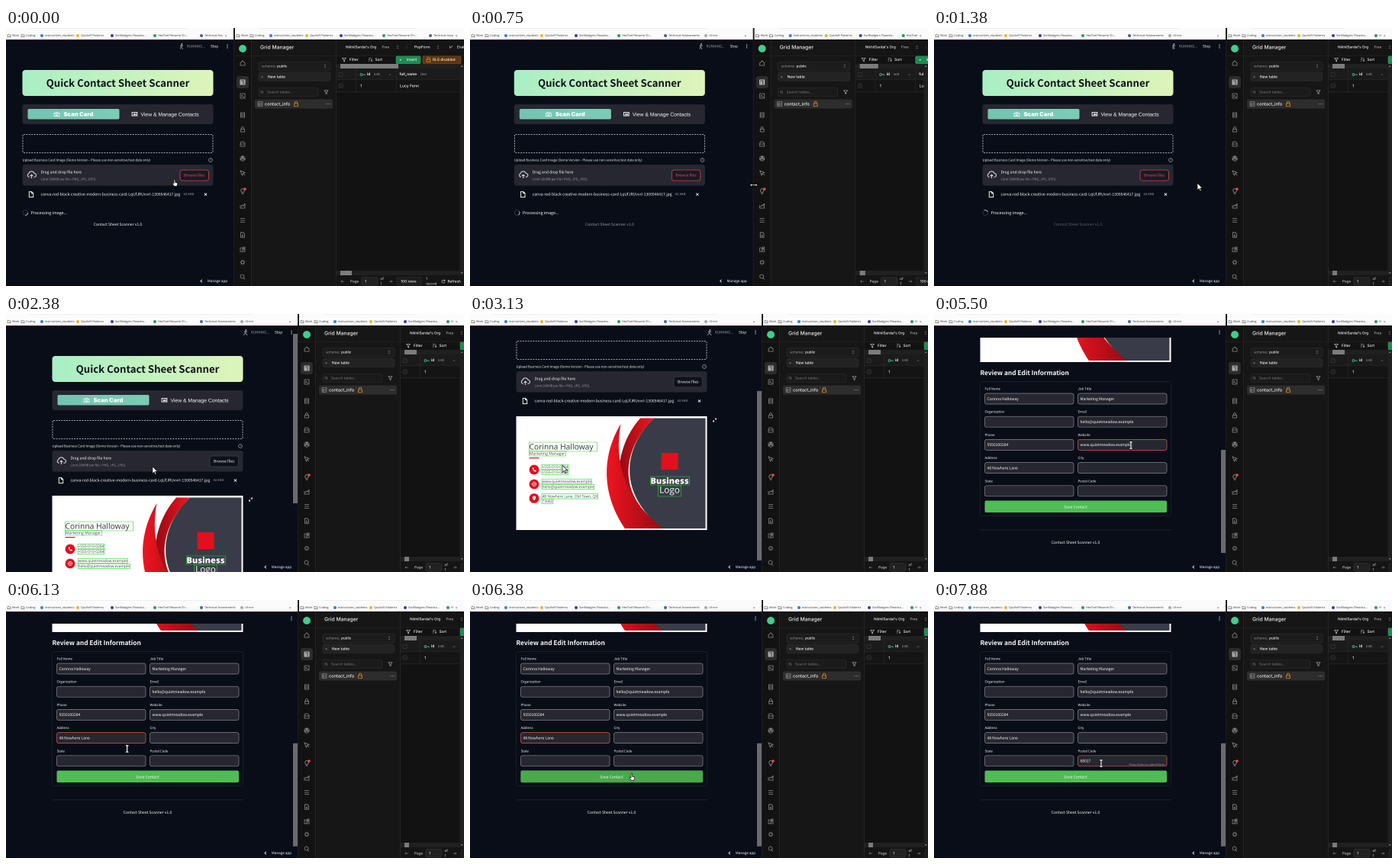
An HTML page with a canvas that plays this animation: 600x338 px, repeating every 8 s.

```html
<!DOCTYPE html>
<html lang="en">
<head>
<meta charset="utf-8">
<title>Contact scanner demo</title>
<style>
html, body { margin: 0; width: 100%; height: 100%; overflow: hidden; background: #090d17; }
canvas { display: block; width: 600px; height: 338px; }
</style>
</head>
<body>
<canvas id="stage"></canvas>
<script>
const W = 600, H = 338, LOOP = 8000, STEP = 125;
const canvas = document.getElementById('stage'), c = canvas.getContext('2d');
// Double resolution keeps the tiny text smooth
const scale = 2 * (window.devicePixelRatio || 1);
canvas.width = W * scale;
canvas.height = H * scale;
c.textRendering = 'geometricPrecision';

const SOURCE = '"Noto Sans CJK JP", "Noto Sans CJK SC", "Open Sans", sans-serif';
const UI = 'Inter, sans-serif', ARIAL = '"Liberation Sans", sans-serif', OPEN = '"Open Sans", sans-serif';
const WHITE = '#fafafa', GREY = '#9a9ca5', PANEL = '#262730', RED = '#e0101c', PAGE = '#090d17';

// Drawing helpers
function text(s, x, y, size, color = WHITE, font = SOURCE, weight = 500, align = 'left') {
  c.font = `${weight} ${size}px ${font}`;
  c.fillStyle = color;
  c.textAlign = align;
  c.fillText(s, x, y + size * 0.35);
}
function box(x, y, w, h, fill, r = 0, stroke, line = 0.6) {
  c.beginPath();
  c.roundRect(x, y, w, h, r);
  if (fill) { c.fillStyle = fill; c.fill(); }
  if (stroke) { c.strokeStyle = stroke; c.lineWidth = line; c.stroke(); }
}
function dot(x, y, r, fill) {
  c.beginPath();
  c.arc(x, y, r, 0, 7);
  c.fillStyle = fill;
  c.fill();
}
function path(d, x, y, stroke, line = 0.8, fill) {
  const p = new Path2D(d);
  c.save();
  c.translate(x, y);
  if (fill) { c.fillStyle = fill; c.fill(p); }
  if (stroke) { c.strokeStyle = stroke; c.lineWidth = line; c.stroke(p); }
  c.restore();
}
function gradient(x0, x1, from, to) {
  const g = c.createLinearGradient(x0, 0, x1, 0);
  g.addColorStop(0, from);
  g.addColorStop(1, to);
  return g;
}
function clipped(x, y, w, h, draw) {
  c.save();
  c.beginPath();
  c.rect(x, y, w, h);
  c.clip();
  draw();
  c.restore();
}
// Eased value between [time, value] keys
function at(t, keys) {
  let i = keys.findIndex(k => k[0] > t);
  if (i < 0) return keys[keys.length - 1][1];
  if (i === 0) return keys[0][1];
  const [t0, a] = keys[i - 1], [t1, b] = keys[i], u = (t - t0) / (t1 - t0);
  return a + (b - a) * u * u * (3 - 2 * u);
}

const ICON = {
  folder: 'M-2-1.5h1.5l.6.6h1.9v2.6h-4z',
  home: 'M-3 0 0-3 3 0V3H-3z',
  table: 'M-3-3H3V3H-3zM-3-1H3M-3 1H3M-1-1V3',
  terminal: 'M-3-3H3V3H-3zM-1.5-1 0 0-1.5 1M.5 1.5H2',
  database: 'M-2.5-3H2.5V3H-2.5zM-2.5-1H2.5M-2.5 1H2.5',
  lock: 'M-2.4-.5H2.4V3H-2.4zM-1.4-.5V-2A1.4 1.4 0 0 1 1.4-2V-.5',
  store: 'M-3-1 -2-3H1L3-1V3H-3zM-3 0H3',
  swirl: 'M3.2 0A3.2 3.2 0 1 1 0-3.2 3.2 3.2 0 0 1 3.2 0M0-3.2 2 1-2 1zM-3 1 0-1 3 1',
  pointer: 'M-3-3 3-.6.4.4-.6 3zM.5.5 3 3',
  bulb: 'M-1.2 2V.8A2.3 2.3 0 1 1 1.2.8V2zM-1 3.2H1',
  chart: 'M-3-1V3H3V-3M-2 1 0-1 1 0 3-3',
  list: 'M-3-2.5H3M-3 0H3M-3 2.5H3',
  doc: 'M-2.4-3.2H.8L2.4-1.6V3.2H-2.4zM-1 .2H1M-1 1.7H1',
  sheet: 'M-2.7-3.6H.6L2.7-1.5V3.6H-2.7zM.6-3.6V-1.5H2.7',
  squares: 'M-3-2H0V3H-3zM0 0H3V3H0zM1-3H3V-1H1z',
  gear: 'M2 0A2 2 0 1 1-2 0 2 2 0 1 1 2 0M0-3.3V-2M0 2V3.3M-3.3 0H-2M2 0H3.3M-2.3-2.3-1.4-1.4M2.3 2.3 1.4 1.4M-2.3 2.3-1.4 1.4M2.3-2.3 1.4-1.4',
  search: 'M2-.5A2.5 2.5 0 1 1-3-.5 2.5 2.5 0 1 1 2-.5M1.3 1.5 3 3.2',
  funnel: 'M-2.4-2.2H2.4L.6.2V2.4L-.6 1.8V.2z',
  cloud: 'M-3 2.8H-3.4A2.6 2.6 0 0 1-3.6-2 3.7 3.7 0 0 1 3.4-2.2 2.5 2.5 0 0 1 3.6 2.8H3M0 4.5V-.3M-1.8 1.4 0-.4 1.8 1.4',
  cross: 'M-1.6-1.6 1.6 1.6M1.6-1.6-1.6 1.6',
  updown: 'M-1-.8 0-1.8 1-.8M-1 .8 0 1.8 1 .8',
  down: 'M-1.2-.6 0 .6 1.2-.6',
  right: 'M-2 0H2M.6-1.4 2 0 .6 1.4',
  left: 'M2 0H-2M-.6-1.4-2 0-.6 1.4',
  idCard: 'M-3.4-2.6H3.4V2H-3.4zM-1.2 0A.8.8 0 1 0-1.2-.1M1-.8H2.4M1 .6H2.4',
  camera: 'M-3.4-1.6H-1.6L-1-2.6H1L1.6-1.6H3.4V2.6H-3.4zM1.2.4A1.2 1.2 0 1 1 1.2.3',
  expand: 'M.6-.6 2-2M.4-2H2V-.4M-.6.6-2 2M-.4 2H-2V.4'
};
const RAIL = [['home', 46], ['table', 71], ['terminal', 89], ['database', 114], ['lock', 133], ['store', 152],
  ['swirl', 171], ['pointer', 190], ['bulb', 214], ['chart', 233], ['list', 252], ['doc', 271],
  ['squares', 290], ['gear', 307], ['search', 326]];
const BOOKMARKS = [[8, 'Work'], [26, 'Coding'], [51, 'instructions_students', '#3b7de0'],
  [98, 'Quizloft Patterns', '#f0b429'], [143, 'SortBadgers Flowcha...', '#3f3fa8'],
  [199, 'HexTrail Resume Ch...', '#2f9e57'], [260, 'Technical Assessments', '#4a6a9c'], [313, 'I-Error', '#aaa']];

function chrome(x, w) {
  clipped(x, 0, w, 15, () => {
    box(x, 0, w, 15, '#fbfbfc');
    box(x + 30, -4, w - 90, 5, '#eceef2', 3);
    for (const [tx, label, color] of BOOKMARKS) {
      if (color) dot(x + tx - 4, 10, 2, color);
      else path(ICON.folder, x + tx - 4, 10, '#555', 0.6);
      text(label, x + tx, 9.7, 3.85, '#333', OPEN);
    }
    box(x + w - 14, 5, 14, 10, '#fbfbfc');
    text('»', x + w - 11, 9.7, 5, '#444', OPEN);
  });
}

// Business card, origin at its top-left corner
function card() {
  box(0, 0, 250, 149, '#fff');
  clipped(2, 2.5, 246, 144.5, () => {
    path('M181 2C136 45 136 105 193 148H249V2z', 0, 0, null, 0, '#393c48');
    path('M163 2C140 28 130 60 134 118H163C139 88 140 42 181 2z', 0, 0, null, 0, gradient(132, 178, '#8e0a12', '#ef1520'));
    path('M137 10C113 50 110 100 143 148H194C150 115 126 70 137 10z', 0, 0, null, 0, gradient(117, 190, '#ef1520', '#980b14'));
  });
  text('Corinna Halloway', 17, 40, 10.3, '#33343c', OPEN, 400);
  text('Marketing Manager', 17.5, 48.5, 5.1, '#44454c', OPEN, 400);
  box(17, 54, 13, 1.2, RED);
  for (const y of [70, 89, 107.5]) dot(23.5, y, 6.4, RED);
  path('M-2-2.5C-2 1 0 2.5 2.5 2.5L2.8 1 1.2.3.4 1-.8-.4 0-1.2-.8-2.8z', 23.5, 70, null, 0, '#fff');
  path('M2.6 0A2.6 2.6 0 1 1-2.6 0 2.6 2.6 0 1 1 2.6 0M-2.6 0H2.6M0-2.6V2.6', 23.5, 89, '#fff', 0.6);
  path('M0 3C-4-2-1.5-3 0-3S4-2 0 3z', 23.5, 107.5, null, 0, '#fff');
  const lines = [['+555-010-0284', 66.5], ['+555-010-0284', 73.5], ['www.quietmeadow.example', 85.5],
    ['hello@quietmeadow.example', 92.5], ['48 Nowhere Lane, Old Town, QX', 105], ['73082', 111.5]];
  for (const [s, y] of lines) {
    text(s, 34, y, 4.9, '#44454c', OPEN, 400);
    box(33.5, y - 3.3, c.measureText(s).width + 1, 6.4, null, 0, '#25d825');
  }
  box(190, 48, 22, 22, RED);
  text('Business', 201, 84.5, 11, '#fff', OPEN, 800, 'center');
  text('Logo', 201, 96.5, 11.8, '#fff', OPEN, 400, 'center');
  for (const b of [[17, 34, 89, 12], [17, 45.5, 48, 6.5], [176, 79, 51, 11], [186, 91, 30, 14]]) box(...b, null, 0, '#25d825');
}

function uploader(s) {
  box(0, 55, 250, 34, gradient(0, 250, '#a9efc5', '#def5ba'), 4);
  text('Quick Contact Sheet Scanner', 125, 72.5, 13.2, '#10131a', SOURCE, 700, 'center');
  box(0, 100, 250, 26, PANEL, 3);
  box(7, 106, 120, 13.5, gradient(7, 127, '#74c4b2', '#7cccb6'), 2);
  path(ICON.camera, 45, 113, '#fff', 0.8);
  text('Scan Card', 54, 113, 7.6, '#fff', UI, 900);
  path(ICON.idCard, 147, 113, '#fff', 0.9);
  text('View & Manage Contacts', 155, 113, 6.8, '#fff', ARIAL, 400);
  c.setLineDash([2, 1.4]);
  box(0.5, 139.5, 249, 24, null, 1, '#d8d8dc', 0.8);
  c.setLineDash([]);
  text('Upload Business Card Image (Demo Version - Please use non-sensitive/test data only)', 0, 173, 4.25);
  path('M2.4 0A2.4 2.4 0 1 1-2.4 0 2.4 2.4 0 1 1 2.4 0', 246.5, 173, '#bbb', 0.6);
  text('?', 246.5, 173, 3.6, '#ccc', SOURCE, 500, 'center');
  box(0, 179, 250, 27.5, PANEL, 3);
  path(ICON.cloud, 12, 192.5, '#c4c6ce', 1.2);
  text('Drag and drop file here', 24, 188.5, 5.05);
  text('Limit 200MB per file • PNG, JPG, JPEG', 24, 198, 4.15, GREY);
  const active = !s.cardShown;
  box(206.5, 186, 37.5, 14, active ? '#171a24' : '#0e111b', 3, active ? '#d8434b' : '#3c3f4a', 0.8);
  text('Browse files', 225.2, 193, 4.9, active ? '#f04a50' : WHITE, SOURCE, 500, 'center');
  path(ICON.sheet, 11.5, 218, '#eee', 1);
  text('canva-red-black-creative-modern-business-card-LqUfJRUvvrI-1300546417.jpg', 24, 217.5, 5.05);
  text('82.9KB', 211, 217.5, 4.2, GREY);
  path(ICON.cross, 240, 218, '#eee', 0.9);
}

function field(label, value, x, y, focused) {
  text(label, x, y, 4.35);
  box(x, y + 6, 116.5, 14, PANEL, 2.5, focused ? '#e2574f' : '#85868e', 0.7);
  text(value, x + 3, y + 13, 5);
}

function form(s) {
  text('Review and Edit Information', 0, 401, 8.3, WHITE, SOURCE, 700);
  box(0, 412.5, 250, 176, null, 3, '#22252f', 0.7);
  const rows = [['Full Name', 'Corinna Halloway', 'Job Title', 'Marketing Manager'],
    ['Organization', '', 'Email', 'hello@quietmeadow.example'],
    ['Phone', '5550100284', 'Website', 'www.quietmeadow.example'],
    ['Address', '48 Nowhere Lane', 'City', ''],
    ['State', '', 'Postal Code', s.postal]];
  rows.forEach(([l1, v1, l2, v2], i) => {
    const y = 422 + i * 30.2;
    field(l1, v1, 6, y, s.focus === l1);
    field(l2, v2, 128, y, s.focus === l2);
    if (s.focus === l2 && s.caret) box(131.5 + c.measureText(v2).width, y + 10, 0.6, 6, '#fff');
  });
  if (s.postal) text('Press Enter to submit form', 242, 560.5, 3.8, GREY, SOURCE, 400, 'right');
  box(6, 568.5, 238.5, 15.5, s.hover ? '#4aa84d' : '#4fbd55', 2, s.hover ? '#3f9143' : null);
  text('Save Contact', 125, 576.5, 5, '#f4fff4', SOURCE, 500, 'center');
  box(0, 606.5, 250, 0.7, '#2b2e38');
  footer(623, 1);
}
function footer(y, alpha) {
  text('Contact Sheet Scanner v1.0', 125, y, 5, `rgba(244,245,247,${alpha})`, SOURCE, 500, 'center');
}

function leftPane(s) {
  const w = s.split - 1;
  box(0, 0, w, H, PAGE);
  clipped(0, s.scroll ? 31 : 15, w, H, () => {
    c.translate(s.split / 2 - 128 - (s.cardShown ? 3 : 0), -s.scroll);
    uploader(s);
    if (s.cardShown) {
      c.save();
      c.translate(0, 238);
      card();
      c.restore();
      if (!s.formShown) path(ICON.expand, 260, 243, '#ddd', 0.9);
    } else {
      const a = s.t / 130;
      c.lineWidth = 0.8;
      c.strokeStyle = '#3a3d48';
      c.beginPath(); c.arc(3.8, 242, 3.4, 0, 7); c.stroke();
      c.strokeStyle = '#d5d6da';
      c.beginPath(); c.arc(3.8, 242, 3.4, a, a + 1.6); c.stroke();
      text('Processing image...', 11, 242, 5.3);
      footer(257, s.stale);
    }
    if (s.formShown) form(s);
  });
  box(0, 14.8, w, 0.8, '#7c2c36');
  if (!s.formShown) {
    const k = Math.sin(s.t / 60);
    path(`M0-1.5-1 1.5-${2 + k} 3.5M-1 1.5 1 2 ${1 + k} 4M-2-.5 0-1.5 2 0`, s.split - 69, 24, '#a9abb3', 0.8);
    dot(s.split - 68.6, 21, 1, '#a9abb3');
    text('RUNNING...', s.split - 62, 24, 4.5, '#a0a2aa');
    text('Stop', s.split - 31, 24, 4.7);
  }
  for (const y of [22, 24, 26]) dot(s.split - 9, y, 0.6, '#eee');
  path('M1-1.8-1 0 1 1.8', s.split - 43, 331.5, '#eee', 0.9);
  text('Manage app', s.split - 35, 331.5, 4.6);
  if (s.cardShown) {
    const k = s.formShown ? 0.469 : 0.72;
    box(s.split - 7, 26 + s.scroll * k, 6, s.formShown ? 135 : 222, '#6a6b70');
  }
}

function sidebar() {
  box(299, 15, 22, H, '#121212');
  dot(310, 27, 5, '#3ecf8e');
  box(302, 63, 16, 16, '#2c2c2c', 3);
  for (const [name, y] of RAIL) path(ICON[name], 310, y, name === 'table' ? '#eee' : '#8c8c8c', 0.8);
  dot(313, 211, 1.8, '#e5484d');

  box(321, 15, 111, H, '#161616');
  text('Grid Manager', 333, 25, 6.8, '#f0f0f0', UI);
  box(331, 44.5, 94, 11.5, '#1c1c1c', 2.5, '#333');
  text('schema:', 335, 50, 4.5, '#888', UI);
  text('public', 355, 50, 4.6, '#eee', UI);
  path(ICON.updown, 418, 50, '#888', 0.6);
  box(331, 58, 94, 11.5, '#232323', 2.5, '#2f2f2f');
  text('+', 334, 63.8, 5, '#aaa', UI);
  text('New table', 343, 63.8, 4.8, '#f2f2f2', UI);
  box(331, 78.5, 78, 11, '#1a1a1a', 2.5, '#303030');
  c.save();
  c.translate(335.5, 84);
  c.scale(0.55, 0.55);
  path(ICON.search, 0, 0, '#777', 1);
  c.restore();
  text('Search tables...', 342, 84, 4.6, '#6c6c6c', UI);
  path(ICON.funnel, 419.5, 84, '#aaa', 0.7);
  box(326, 93.5, 102, 12, '#2d2d2d', 2);
  path(ICON.table, 333, 99.5, '#aaa', 0.5);
  text('contact_info', 339, 99.3, 5.6, '#f5f5f5', UI);
  path(ICON.lock, 380, 99.5, '#e08a1e', 0.8);
  for (const x of [420, 422, 424]) dot(x, 99.5, 0.5, '#aaa');
}

function grid(shift) {
  box(432, 15, 400, H, '#121212');
  box(432, 15, 400, 21, '#151515');
  text("NikhilSardal's Org", 445, 25, 4.7, '#f2f2f2', UI);
  text('Free', 492.5, 25, 4.6, '#aaa', UI);
  path(ICON.updown, 513, 25, '#888', 0.6);
  text('/', 524, 25, 5, '#555', UI);
  text('PopForm', 535, 25, 4.8, '#f2f2f2', UI);
  path(ICON.updown, 566, 25, '#888', 0.6);
  path('M-1.6-2V2M1.6-2V-1C1.6.5-1.6 0-1.6 1.4', 583, 25, '#aaa', 0.7);
  text('Enable branching', 591, 25, 4.7, '#eee', UI);
  path(ICON.funnel, 443, 41.5, '#bbb', 0.7);
  text('Filter', 450, 41.5, 4.8, '#f2f2f2', UI);
  path('M-2-1.8H1M-2 0H0M-2 1.8H-.8M2-2V2M1 1 2 2 3 1', 477, 41.5, '#bbb', 0.7);
  text('Sort', 483.5, 41.5, 4.8, '#f2f2f2', UI);
  box(511, 36.5, 32, 10.5, '#1c8c50', 2, '#2ba56c');
  path(ICON.down, 517, 41.7, '#dfe', 0.7);
  text('Insert', 525, 41.5, 4.8, '#f2fff8', UI);
  box(546, 36.5, 50, 10.5, '#5e3512', 2, '#8a5a22');
  path(ICON.lock, 553.5, 41.6, '#e08a1e', 0.7);
  text('RLS disabled', 559, 41.5, 4.8, '#f2e4d6', UI);

  box(432, 47, 400, 6, '#202020');
  box(438, 47, 76 - shift * 0.714, 6, '#7c7c7c');
  box(432, 53, 400, 14.5, '#1b1b1b');
  box(432, 67.5, 400, 16, '#141414');
  for (const y of [67.5, 83.5]) box(432, y, 400, 0.6, '#2a2a2a');
  for (const x of [458, 511]) box(x, 53, 0.6, 30.5, '#2a2a2a');
  for (const y of [61, 75.5]) box(436, y - 2.6, 5.2, 5.2, '#1d1d1d', 1, '#3c3c3c');
  path('M.3 0A1.4 1.4 0 1 1-2.5 0 1.4 1.4 0 1 1 .3 0M.3 0H3.5V1.2', 466.5, 61, '#3ecf8e', 0.8);
  text('id', 473, 60.5, 4.9, '#f5f5f5', UI, 600);
  text('int8', 482, 60.5, 4.3, '#8c8c8c', UI);
  path(ICON.down, 503, 61, '#777', 0.6);
  text('full_name', 515.5, 60.5, 4.8, '#f5f5f5', UI, 600);
  text('text', 543, 60.5, 4.4, '#8c8c8c', UI);
  text('1', 464, 75.5, 5, '#f0f0f0', UI);
  text('Lucy Fenn', 516, 75.5, 5.1, '#f0f0f0', UI);

  box(432, 318, 400, 6, '#202020');
  box(438, 318, 15 - shift * 0.107, 6, '#7c7c7c');
  box(432, 324, 400, 14, '#151515');
  path(ICON.left, 441, 332, '#777', 0.7);
  text('Page', 451, 332, 4.7, '#bbb', UI);
  box(466, 326.5, 21, 10.5, '#212121', 2, '#3a3a3a');
  text('1', 470, 332, 4.8, '#f0f0f0', UI);
  text('of', 490.5, 328.5, 4.6, '#bbb', UI);
  text('1', 490.5, 335, 4.6, '#bbb', UI);
  path(ICON.right, 504, 332, '#777', 0.7);
  box(512, 326.5, 32, 10.5, '#1d1d1d', 2, '#333');
  text('100 rows', 517, 332, 4.8, '#f0f0f0', UI);
  text('1', 550, 328.5, 4.6, '#bbb', UI);
  text('record', 550, 335, 4.6, '#bbb', UI);
  path('M1.8-.8A2 2 0 1 0 1.8.9M2-2.2V-.6H.4', 573, 332, '#bbb', 0.7);
  text('Refresh', 578.5, 332, 4.7, '#f0f0f0', UI);
}

function rightPane(split) {
  const shift = split - 299;
  box(split - 1, 0, 2, H, '#1c1c1f');
  clipped(split, 15, W - split, H, () => {
    c.translate(shift, 0);
    sidebar();
    grid(shift);
    box(299, 36, 500, 0.6, '#262626');
    for (const x of [321, 432]) box(x, 15, 0.7, H, '#2a2a2a');
  });
  box(594.5, 47, 5.5, 277, '#202020');
  path('M-1.4 1 0-1 1.4 1z', 597.2, 50, null, 0, '#8a8a8a');
  path('M-1.4-1 0 1 1.4-1z', 597.2, 321, null, 0, '#8a8a8a');
}

const POINTER = {
  arrow: 'M0 0V9.4L2.2 7.4 3.7 10.8 5.1 10.2 3.7 6.9H6.7z',
  hand: 'M-1-3.5C-1-4.8.6-4.8.6-3.5V-.8L3.6 0V2.2L2.7 4.2H-.8L-3 1C-2.8-.2-1.6 0-1 .8z'
};
function pointer({ x, y, kind }) {
  if (kind === 'text') {
    const beam = 'M-1.8-4.2H1.8M0-4.2V4.2M-1.8 4.2H1.8';
    path(beam, x, y, '#000', 2);
    path(beam, x, y, '#fff', 1.2);
  } else if (kind === 'resize') {
    path('M-5 0-2.5-2.5V-.7H2.5V-2.5L5 0 2.5 2.5V.7H-2.5V2.5z', x, y, '#000', 0.7, '#fff');
  } else path(POINTER[kind], x, y, '#111', 0.7, '#fff');
}

// Everything that depends on time
function state(t) {
  const kinds = [[0, 'hand'], [250, 'resize'], [960, 'arrow'], [3740, 'text'], [6240, 'hand'], [6740, 'text']];
  const focuses = [[0, ''], [4990, 'Website'], [5990, 'Address'], [6990, 'Postal Code']];
  const last = list => list.filter(k => k[0] <= t).pop()[1];
  const focus = last(focuses);
  return {
    t, focus,
    split: at(t, [[250, 299], [900, 383]]),
    scroll: at(t, [[2500, 0], [3000, 104], [3370, 104], [3760, 324], [5620, 324], [5900, 345]]),
    cardShown: t >= 2250,
    formShown: t >= 3370,
    stale: at(t, [[400, 1], [1000, 0.35]]),
    postal: '68027'.slice(0, Math.max(0, Math.floor((t - 7000) / 125))),
    caret: focus === 'Website',
    hover: t >= 6240 && t < 6740,
    cursor: {
      kind: last(kinds),
      x: at(t, [[0, 221], [250, 299], [900, 383], [1375, 345], [2000, 345], [2600, 121], [3370, 121], [3875, 283], [4300, 283], [5000, 258], [5500, 258], [5900, 140], [6000, 140], [6375, 212], [6500, 212], [6875, 219]]),
      y: at(t, [[0, 203], [900, 206], [1375, 203], [2000, 203], [2600, 198], [3370, 198], [3875, 135], [4300, 135], [5000, 172], [5500, 172], [5900, 182], [6000, 182], [6375, 232], [6500, 232], [6875, 214]])
    }
  };
}

function frame(now) {
  const t = Math.floor((now % LOOP) / STEP) * STEP, s = state(t);
  c.setTransform(scale, 0, 0, scale, 0, 0);
  leftPane(s);
  rightPane(s.split);
  chrome(0, s.split - 1);
  chrome(s.split + 1, W - s.split - 1);
  pointer(s.cursor);
  requestAnimationFrame(frame);
}
requestAnimationFrame(frame);
</script>
</body>
</html>
```
